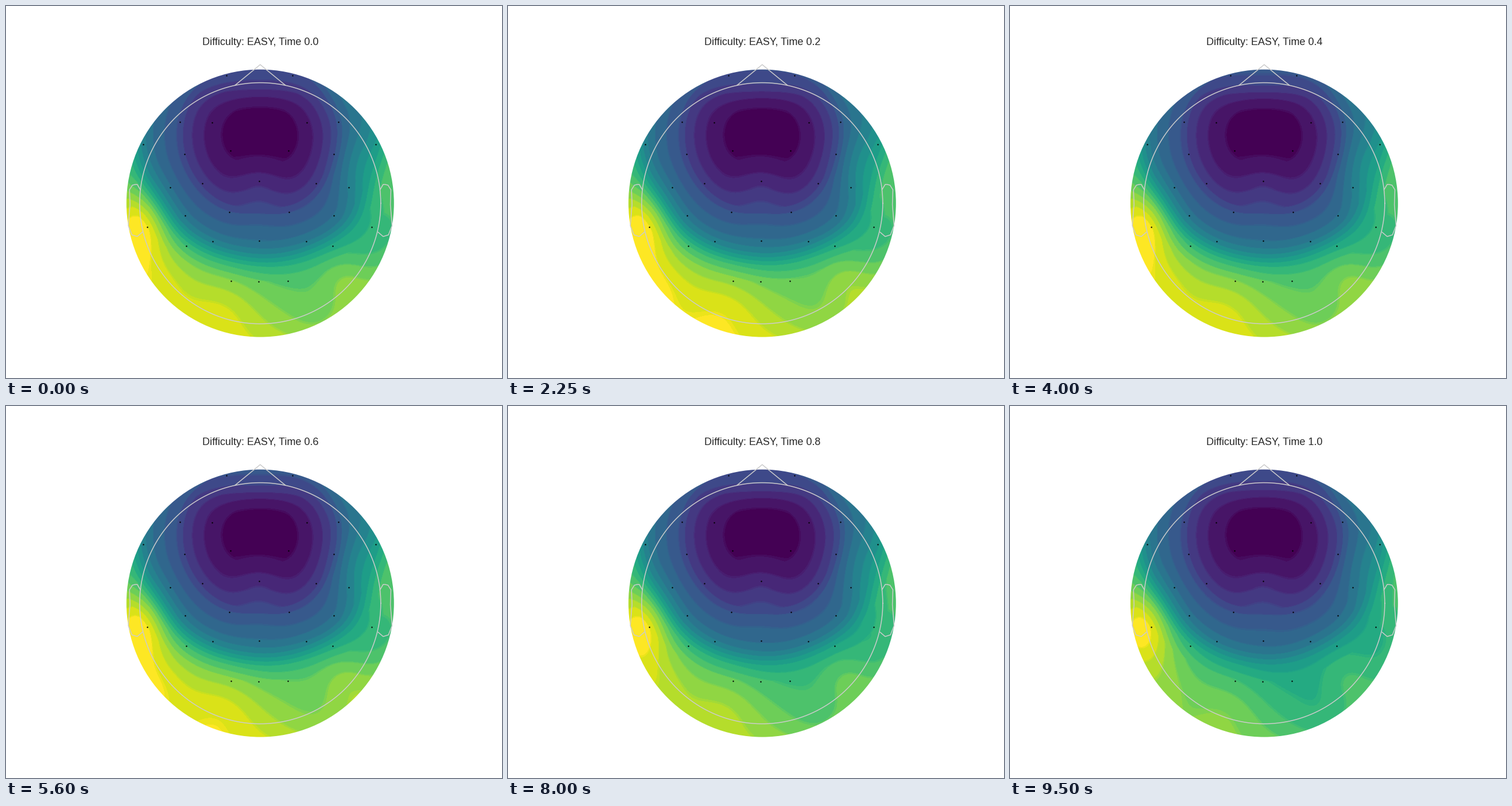
Animation of 864 by 648 pixels, one loop 10 s. Source, as a matplotlib script:

```python
import numpy as np
import matplotlib.pyplot as plt
from matplotlib.animation import FuncAnimation
from matplotlib.patches import Circle

W, H, DPI = 864, 648, 108
FRAMES, STEP = 200, 50
CX, CY, R, HEAD = 442.8, 343.6, 233, 210
BANDS = 18
HOLD = 350
HOLDS = (750, 2950, 3600, 4800, 6150, 6700, 8000, 8900)

# Electrodes of the left half and the midline; the right half mirrors the left
LEFT = np.array([(383.5, 120.5), (303, 202), (358.5, 202.5), (238.5, 240.5),
                 (311, 257.5), (390.5, 252), (285.5, 316), (342, 308.5),
                 (311.5, 365), (389, 359), (245.5, 385), (313.5, 417.5),
                 (359.5, 410), (391.5, 479)])
MIDLINE = np.array([(441, 304.5), (440.5, 408.5), (439.5, 479.5)])

# Level against distance from the frontal minimum
WELL = 443, 225
DISTANCE = [0, 60, 97, 130, 145, 185, 203, 230, 255, 300, 350]
LEVEL = [-0.5, 0.3, 1.5, 3.1, 4.5, 6.4, 7.8, 11.4, 13.2, 14.5, 16]

x, y = np.meshgrid(np.arange(209, 677) + 0.5, np.arange(109, 578) + 0.5)


def bump(cx, cy, sx, sy):
    return np.exp(-((x - cx) / sx) ** 2 / 2 - ((y - cy) / sy) ** 2 / 2)


front = bump(443, 125, 75, 28)
right = bump(625, 285, 40, 60)
back = 1 / (1 + np.exp((440 - y) / 25))

base = np.interp(np.hypot(x - WELL[0], y - WELL[1]), DISTANCE, LEVEL)
base += 2.1 * front + 2.9 * right
base += 1.3 * bump(441, 318, 30, 45)     # ridge on the midline
base += 4.6 * bump(232, 385, 35, 48)     # left temple
base += 2.0 * bump(270, 475, 45, 45)     # left back
base += 1.9 * bump(375, 520, 50, 50)     # back
base += 1.0 * bump(590, 475, 28, 28)     # right back
base += 1.3 * bump(590, 150, 40, 40)     # right front
base -= 2.0 * bump(650, 400, 55, 55)     # right temple
base -= 1.2 * bump(545, 555, 45, 45)


def shown_time(ms):
    """The map moves every 100 ms and pauses now and then."""
    t = 0 if ms < 500 else min(ms // 100 * 100, 9500)
    for h in HOLDS:
        if h < t < h + HOLD:
            t = h
    return t


def banded(z):
    """Quantise to colour bands with a thin half-step at each border."""
    z = np.clip(z, 0, BANDS) + 0.5
    k = np.floor(z)
    return k - 0.5 * ((z - k < 0.1) & (k > 0))


def field(ms):
    p = shown_time(ms) / 10000
    swell = 0.3 * (1 - np.cos(5 * np.pi * p)) - 4 * p ** 6
    rise = 0.6 * np.sin(np.pi * p)
    return banded(base + swell * (back + 0.45 * right) + rise * front)


fig = plt.figure(figsize=(W / DPI, H / DPI), dpi=DPI, facecolor="white")
ax = fig.add_axes([0, 0, 1, 1])
image = ax.imshow(field(0), cmap="viridis", vmin=0, vmax=BANDS, aspect="auto",
                  extent=(209, 677, 578, 109), interpolation="nearest")
image.set_clip_path(Circle((CX, CY), R, transform=ax.transData))
ax.set_xlim(0, W)
ax.set_ylim(H, 0)
ax.axis("off")


def outline(u, v):
    ax.plot(CX + np.asarray(u) * HEAD, CY - np.asarray(v) * HEAD,
            color="#cccccc", lw=1)


turn = np.linspace(0, 2 * np.pi, 200)
outline(np.cos(turn), np.sin(turn))
nose = np.radians(12)
outline([-nose, 0, nose], [np.cos(nose), 1.15, np.cos(nose)])
ear_x = 2 * np.array([0.497, 0.510, 0.518, 0.530, 0.542,
                      0.540, 0.547, 0.532, 0.510, 0.489])
ear_y = 2 * np.array([0.056, 0.078, 0.078, 0.075, 0.056,
                      -0.006, -0.093, -0.131, -0.138, -0.120])
for side in (-1, 1):
    outline(side * ear_x, ear_y)

mirrored = LEFT * (-1, 1) + (882, 0)
dots = np.vstack([LEFT, MIDLINE, mirrored])
ax.plot(*dots.T, "o", color="black", ms=1.6, mew=0)

title = ax.text(CX, 68, "", ha="center", va="baseline", fontsize=12,
                family="Liberation Sans", color="#262626")


def update(i):
    image.set_data(field(i * STEP))
    title.set_text(f"Difficulty: EASY, Time {i / (FRAMES - 1):.1f}")
    return image, title


anim = FuncAnimation(fig, update, frames=FRAMES, interval=STEP,
                     repeat=True, repeat_delay=0)
plt.show()
```
